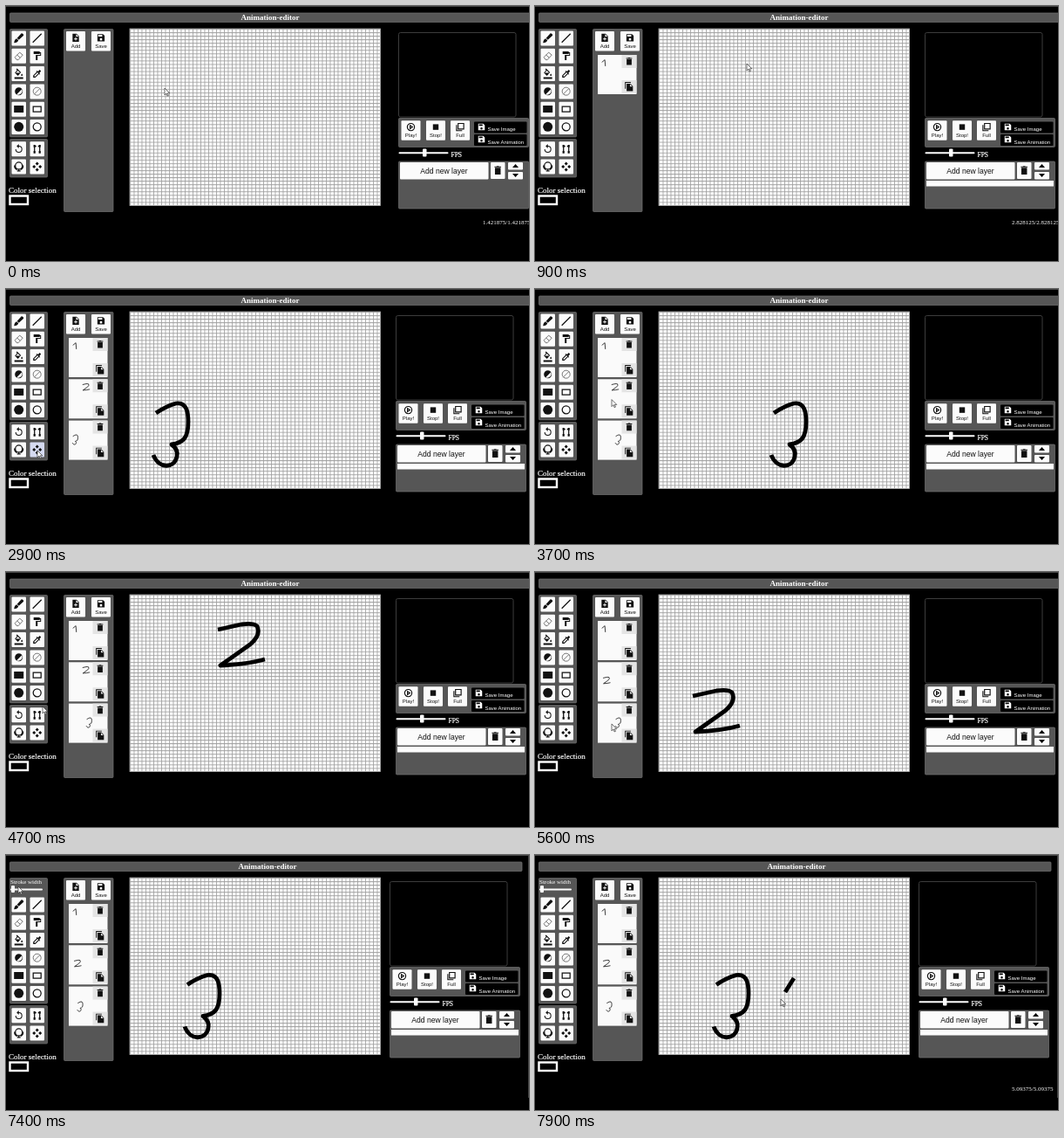
Recreate the animation shown at these times as an HTML page. Size 600 px wide and 292 px high, loop 8000 ms.

```html
<!DOCTYPE html>
<html lang="en">
<head>
<meta charset="utf-8">
<title>Animation-editor</title>
<style>
html, body { margin: 0; width: 100%; height: 100%; overflow: hidden; background: #000; }
svg { display: block; }
text { fill: #fff; font-family: "Liberation Serif", serif; }
.ui { fill: #111; font-family: "Liberation Sans", sans-serif; }
.panel { fill: #565656; stroke: #717171; stroke-width: .7; }
.btn { fill: #fbfbfb; }
.line { fill: none; stroke: #111; stroke-width: 2.5; }
.faint { fill: none; stroke: #777; stroke-width: 2; }
.ink path { fill: none; stroke: #000; stroke-width: 4.8; stroke-linejoin: round; }
</style>
</head>
<body>
<svg id="stage" width="600" height="292" viewBox="0 0 600 292"></svg>
<script>
// Icons live in a 24 unit box
const CIRCLE = 'M12 3a9 9 0 1 0 0 18 9 9 0 0 0 0-18';
const ICONS = {
  trash: 'M6 21h12V7H6zM19 4h-4l-1-1h-4l-1 1H5v2h14z',
  save: 'M17 3H3v18h18V7zM12 19a3 3 0 1 1 0-6 3 3 0 0 1 0 6zM15 9H5V5h10z',
  copy: 'M16 1H2v16h2V3h12zM15 5l6 6v12H6V5zM14 12h6l-6-6z',
  add: 'M14 2H4v20h16V8zM16 16h-3v3h-2v-3H8v-2h3v-3h2v3h3zM13 9V3l6 6z',
  brush: 'M1 23c1-5 2-9 6-10l4 4c-1 4-5 6-10 6zM8 12L18 1q5 0 5 5L12 16z',
  line: 'M2 22L22 2',
  eraser: 'M3 15L14 4l7 6-10 11H7zM8 10l7 6',
  roller: 'M18 4V2H4v6h14V6h1v4H9v12h4V12h8V4z',
  fill: 'M17 9L8 0 6 2l2 2-5 6 7 7zM5 10l5-5 5 5zM19 12q-4 5 0 5t0-5zM2 20h20v4H2z',
  dropper: 'M21 6l-3-3-4 4-2-2-2 2 1 1-8 8v5h5l8-8 2 1 1-1-2-2zM7 19l-2-2 8-8 2 2z',
  contrast: CIRCLE + 'zM19 7L7 19A9 9 0 0 0 19 7z',
  none: CIRCLE + 'M5 19L19 5',
  block: 'M1 4h22v16H1z',
  box: 'M3 6h18v12H3z',
  ball: 'M12 1a11 11 0 1 0 0 22 11 11 0 0 0 0-22z',
  disc: CIRCLE + 'z',
  undo: 'M12 5V1L7 6l5 5V7a6 6 0 1 1-6 6H4a8 8 0 1 0 8-8z',
  nodes: 'M6 18V6h4M18 18V6h-4M5 4h2v3H5zM17 4h2v3h-2zM5 18h2v3H5zM17 18h2v3h-2z',
  ring: 'M12 2a8 8 0 1 0 0 16 8 8 0 0 0 0-16M8 22h8M12 18v4M2 9q0 8 6 10M22 9q0 8-6 10',
  move: 'M12 1l4 4-4 4-4-4zM12 15l4 4-4 4-4-4zM5 8l4 4-4 4-4-4zM19 8l4 4-4 4-4-4z',
  play: CIRCLE + 'M10 8v8l6-4z',
  stop: 'M5 5h14v14H5z',
  full: 'M7 3h14v14H7zM3 7v14h14'
};
const LINE = 'class="line"', FAINT = 'class="faint"';
const rect = (x, y, w, h, attrs = 'class="btn" rx="1"') =>
  `<rect x="${x}" y="${y}" width="${w}" height="${h}" ${attrs}/>`;
const panel = (x, y, w, h, attrs = '') => rect(x, y, w, h, 'class="panel" rx="1" ' + attrs);
const text = (x, y, size, str, attrs = '') => `<text x="${x}" y="${y}" font-size="${size}" ${attrs}>${str}</text>`;
const icon = (name, cx, cy, size = 12, attrs = 'fill="#111"') =>
  `<path d="${ICONS[name]}" fill-rule="evenodd" transform="translate(${cx - size / 2} ${cy - size / 2}) scale(${size / 24})" ${attrs}/>`;
const labelled = (name, x, y, attrs) => rect(x, y, 22, 22.5) + icon(name.toLowerCase().replace('!', ''), x + 11, y + 7.3, 11, attrs) +
  text(x + 11, y + 18.8, 6, name, 'class="ui" text-anchor="middle"');

const TOOLS = 'brush line eraser roller fill dropper contrast none block box ball disc undo nodes ring move'.split(' ');
const STYLE = { line: LINE, box: LINE, disc: LINE, nodes: LINE, ring: LINE, eraser: FAINT, none: FAINT };
const tools = TOOLS.map((name, i) => {
  const row = i >> 1, x = i % 2 ? 27.5 : 6.5, y = 28.5 + row * 20.3 + (row > 5 ? 5 : 0);
  return rect(x, y, 16.5, 17, `class="btn" rx="1" id="${name}Tool"`) + icon(name, x + 8.2, y + 8.3, 12, STYLE[name]);
}).join('');

// Handwriting on the canvas: 1, 2, 3 and a last short dash
const STROKES = [
  'M172 80L194 62L198 109',
  'M243 66L270 60Q284 58 288 62Q293 72 280 83L246 107Q275 106 297 100',
  'M172 142Q184 134 195 131C208 129 209 143 209 152C209 170 204 176 190 178Q198 184 196 192C193 206 175 206 169 190',
  'M297 141L287 157'
];
const cardY = i => 56 + 47.3 * i;
const cards = [0, 1, 2].map(i => `<g id="card${i}">` + rect(72, cardY(i), 44.5, 45, 'fill="#fafafa"') +
  ['trash', 'copy'].map((name, k) => rect(99.5, cardY(i) + 29 * k, 17, 15, 'fill="#e4e4e4"') +
    icon(name, 108, cardY(i) + 7.3 + 29 * k, 11.5)).join('') +
  `<g class="ink" transform="translate(72 ${cardY(i)}) scale(.156) translate(-142 -26)"><path id="mini${i}" d="${STROKES[i]}"/></g></g>`
).join('');

const stage = document.getElementById('stage');
stage.innerHTML = `
<defs><pattern id="grid" x="142" y="26" width="4.5" height="4.05" patternUnits="userSpaceOnUse">
  <path d="M.5 0V5" stroke="#a4a4a4" stroke-width=".9"/><path d="M0 .5H5" stroke="#a0a0a0" stroke-width=".9"/></pattern></defs>
${rect(0, 0, 600, .8, 'fill="#555"')}
${panel(4.5, 8, 600, 10.5, 'id="titleBar"')}
${text(303, 16, 9, 'Animation-editor', 'id="title" font-weight="bold" text-anchor="middle"')}
${panel(4.5, 26.5, 43, 123.5, 'id="toolPanel"')}
<g id="strokeWidth">${text(5, 32.5, 7, 'Stroke width')}${rect(5, 38.5, 37, 2)}${rect(6, 35, 4, 8)}</g>
<g id="tools">${panel(4.5, 152.5, 43, 43.5)}${tools}
  ${text(3, 214, 9, 'Color selection', 'stroke="#fff" stroke-width=".2"')}${rect(4.5, 217.5, 20.5, 9.5, 'stroke="#fff" stroke-width="2.4"')}</g>
${panel(66.5, 26.5, 56.5, 209)}${labelled('Add', 69, 29)}${labelled('Save', 98, 29)}${cards}
${rect(142, 26, 287.5, 202.5, 'fill="#fff"')}${rect(142, 26, 287.5, 202.5, 'fill="url(#grid)" stroke="#aaa" stroke-width=".8"')}
<g class="ink">${STROKES.map((d, i) => `<path id="ink${i}" d="${d}"/>`).join('')}</g>
<g id="right">
  ${rect(447.5, 30.5, 134.5, 96.5, 'rx="2" stroke="#3c3c3c"')}
  ${panel(447.5, 128.5, 149, 33)}
  ${labelled('Play!', 450.5, 131.3, LINE)}${labelled('Stop!', 479, 131.3)}${labelled('Full', 507, 131.3, LINE)}
  ${['Image', 'Animation'].map((s, i) => rect(534, 132.5 + i * 14.5, 60.5, 13, 'rx="1"') +
    icon('save', 542.5, 138.5 + i * 14, 10, 'fill="#fff"') +
    text(549.5, 143.3 + i * 14.5, 6, 'Save ' + s, 'class="ui" style="fill:#fff"')).join('')}
  ${rect(447.5, 167.2, 57, 2)}${rect(475, 163.5, 4.5, 9)}${text(507.5, 172.5, 7.5, 'FPS', 'stroke="#fff" stroke-width=".2"')}
  ${panel(447.5, 178, 149, 54)}
  ${rect(449, 179, 101.5, 19.5)}${text(499.5, 192.3, 8.6, 'Add new layer', 'class="ui" text-anchor="middle"')}
  ${rect(553, 179, 16.5, 19)}${icon('trash', 561.2, 188, 13)}
  ${rect(573, 179, 17, 8.5)}${rect(573, 190, 17, 8.5)}
  <path d="M578 185l3.500-4 3.500 4zM578 192l3.500 4 3.500-4z"/>
  ${rect(449, 200, 146, 6.5, 'id="layer" class="btn"')}
</g>
<path id="edge" d="M599.500 0V278" stroke="#444"/>
${text(547, 250, 7, '', 'id="status"')}
<path id="cursor" d="M0 0v8l2-2 1 3 1.500-.6-1.200-2.600h2.500z" fill="#fff" stroke="#333" stroke-width=".7"/>`;

const $ = id => document.getElementById(id);
const set = (id, attrs) => { for (const k in attrs) $(id).setAttribute(k, attrs[k]); };
const show = (id, on) => set(id, { visibility: on ? 'visible' : 'hidden' });
const shift = (id, x, y) => set(id, { transform: `translate(${x} ${y})` });
const span = (t, a, b) => b > a ? Math.min(1, Math.max(0, (t - a) / (b - a))) : +(t >= a);
const ease = u => u * u * (3 - 2 * u);
const mix = (a, b, u) => a.map((v, i) => v + (b[i] - v) * u);

// Everything follows from what the user does, and when
const ADD = [80, 40], MOVE = [36, 185], BRUSH = [14, 36];
const GRAB = { 1: [280, 76], 2: [207, 148] };
const rest = (at, x, y) => ({ at, until: at, point: [x, y] });
const press = (at, point) => ({ at, until: at, point });
const add = (at, card) => ({ at, until: at, point: ADD, card, opens: Math.min(2, card + 1) });
const draw = (at, until, stroke) => ({ at, until, stroke });
const drag = (at, until, digit, to) => ({ at, until, digit, to });
const open = (at, until, card) => ({ at, until, point: [88, cardY(card) + 70 / 3], opens: card });
const STEPS = [
  rest(0, 182, 94), draw(100, 400, 0), add(700, 0), draw(900, 1250, 1), add(1400, 1),
  rest(1500, 173, 80), rest(1600, 164, 98), draw(1700, 2200, 2), add(2500, 2),
  press(2900, MOVE), drag(3200, 3500, 2, [102, 0]),
  open(3700, 4100, 1), press(4400, MOVE), rest(4700, 42, 154), drag(5000, 5300, 1, [-62, 76]),
  open(5450, 5900, 2), press(6200, MOVE), drag(6700, 7000, 2, [36, 6.5]),
  press(7400, BRUSH), draw(7700, 7800, 3), rest(7900, 282, 165), rest(8000, 278, 172)
];
const DRAWS = STEPS.filter(s => 'stroke' in s);
const ADDS = STEPS.filter(s => 'card' in s);

// Where a digit lies; while being dragged (live) or after the drop only
function offset(digit, t, live) {
  return STEPS.filter(s => s.digit === digit && t >= s.at).reduce(
    (pos, s) => mix(pos, s.to, live ? ease(span(t, s.at, s.until)) : +(t >= s.until)), [0, 0]);
}

function place(step, t) {
  if (step.point) return step.point;
  if (step.digit) return offset(step.digit, t, true).map((v, i) => v + GRAB[step.digit][i]);
  const path = $('ink' + step.stroke);
  const p = path.getPointAtLength(path.getTotalLength() * span(t, step.at, step.until));
  return [p.x, p.y];
}

function pointer(t) {
  const next = STEPS.findIndex(s => s.at > t), step = STEPS[next - 1], after = STEPS[next];
  if (t <= step.until) return place(step, t);
  return mix(place(step, step.until), place(after, after.at), ease(span(t, step.until, after.at)));
}

function render(now) {
  const t = Math.floor(now % 8000 / 100) * 100;
  const [x, y] = pointer(t), brush = t >= 7400, drop = brush ? 20 : 0;
  const opened = STEPS.filter(s => 'opens' in s && t >= (s.at + s.until) / 2).pop();
  const current = opened ? opened.opens : 0;

  for (const { stroke, at, until } of DRAWS) {
    const u = span(t, at, until), id = 'ink' + stroke;
    set(id, { pathLength: 1, 'stroke-dasharray': u + ' 2' });
    show(id, u > 0 && (stroke === current || stroke === 3));
    shift(id, ...offset(stroke, t, true));
  }
  for (const { card, at } of ADDS) {
    show('card' + card, t >= at);
    shift('mini' + card, ...offset(card, t, false));
  }

  const hasLayer = t >= ADDS[0].at;
  show('strokeWidth', brush);
  show('edge', brush);
  show('layer', hasLayer);
  set('toolPanel', { height: 123.5 + drop });
  shift('tools', 0, drop);
  shift('right', brush ? -7 : hasLayer ? 0 : 3, 0);
  set('titleBar', { width: brush ? 587.5 : 600 });
  set('title', { x: brush ? 300 : 303 });
  set('moveTool', { style: x > 27 && x < 44 && y > 174 && y < 194 ? 'fill:#d5daf0' : '' });

  // The readout lags slightly behind the pointer
  const inside = x > 142 && x < 429 && y > 26 && y < 228;
  const value = Math.round(2.3 * (pointer(Math.max(0, t - 46))[0] - 142.4)) / 64;
  $('status').textContent = inside ? value + '/' + value : '';
  set('status', { y: 250 + drop });
  shift('cursor', x, y);
  requestAnimationFrame(render);
}
requestAnimationFrame(render);
</script>
</body>
</html>
```
